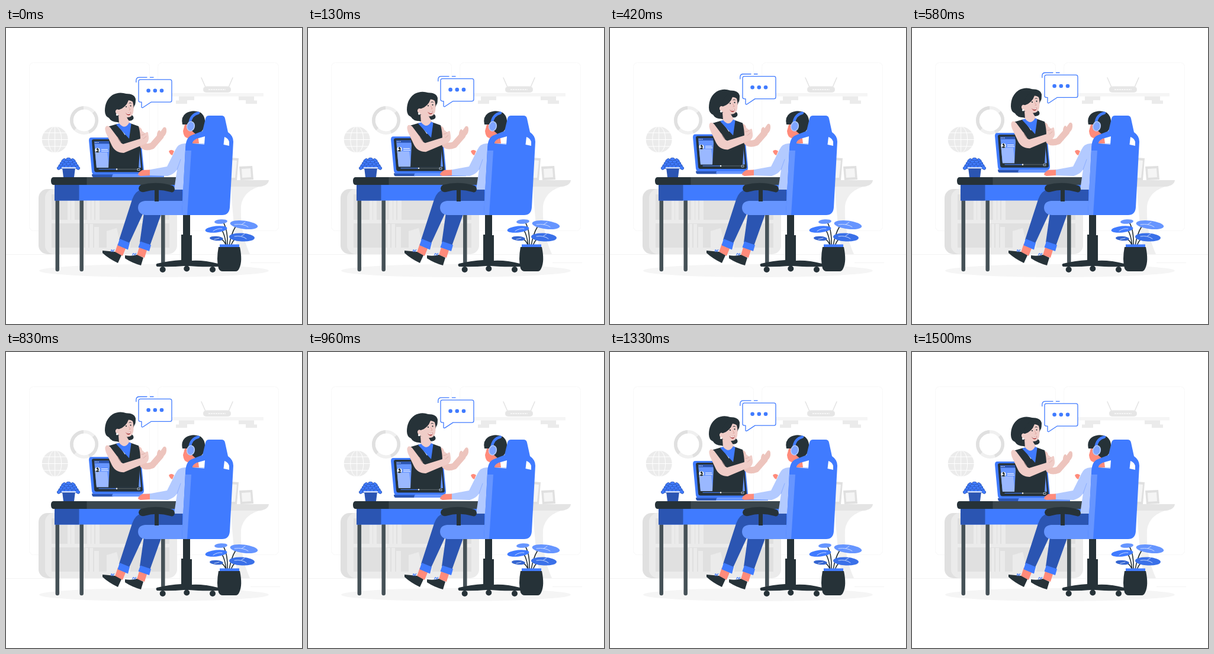
An HTML page that plays this animation: 500x500 px, repeating every 1540 ms.

```html
<!DOCTYPE html>
<html lang="en">
<head>
<meta charset="utf-8">
<title>Video call</title>
<style>
  html, body { margin: 0; height: 100%; overflow: hidden; background: #fff; }
  svg { display: block; width: 100vw; height: 100vh; }
  .blue { fill: #407bff; } .navy { fill: #2b55b2; } .sky { fill: #6695ff; } .pale { fill: #b3caff; }
  .dark { fill: #263238; } .slate { fill: #3b474d; } .coral { fill: #ff8b7b; } .skin { fill: #f0cdc8; }
  .g1 { fill: #f5f5f5; } .g2 { fill: #ebebeb; } .g3 { fill: #e0e0e0; } .white { fill: #fff; }
  .line { fill: none; stroke-linecap: round; stroke-linejoin: round; }
</style>
</head>
<body>
<svg viewBox="0 0 500 500">
  <!-- room -->
  <g fill="none" stroke="#f8f8f8">
    <rect x="39.5" y="58.5" width="203" height="284" rx="7"/>
    <rect x="256.5" y="58.5" width="204" height="284" rx="7"/>
    <path d="M0 382.5H500M413 396.5h50" stroke="#f3f3f3"/>
  </g>
  <ellipse class="g1" cx="250" cy="410" rx="194" ry="11"/>
  <circle class="g2" cx="82.700" cy="188.500" r="22"/>
  <g fill="none" stroke="#fff">
    <ellipse cx="82.700" cy="188.500" rx="11" ry="22"/>
    <path d="M82.700 166v45M60 188.500h45M64 177h38M64 200h38"/>
  </g>
  <g fill="none" stroke-width="5.500">
    <circle cx="132" cy="156" r="21.300" stroke="#f0f0f0"/>
    <path d="M117 171A21.300 21.300 0 0 1 131 134.700M148 142A21.300 21.300 0 0 1 140 175.700" stroke="#e0e0e0"/>
  </g>

  <!-- router shelf -->
  <path class="g1" d="M275 110H435V115.500H275Z"/>
  <path class="g2" d="M292 115.500H318V122H306V128H287V122.500H292ZM419 115.500H393V122H405V128H424V122.500H419Z"/>
  <path class="line" stroke="#e3e3e3" stroke-width="1.500" d="M337 100L330 84M376 100L383 84"/>
  <path fill="#e6e6e6" d="M339 98.500H374Q380 99 380 104T374 109H339Q333 109 333 104T339 98.500Z"/>
  <path stroke="#f5f5f5" stroke-width="2" stroke-dasharray="3 1" d="M342 104h29"/>

  <!-- bookcase -->
  <rect class="g3" x="55" y="272" width="60" height="110" rx="15"/>
  <rect class="g2" x="66" y="272" width="223" height="110" rx="15"/>
  <path class="g3" d="M77 281H276V324H77ZM77 330H276V371H77Z"/>
  <path class="g2" d="M104 290h5v34h-5zM110 290h6v34h-6zM137 290h6v34h-6zM144 290h5v34h-5zM151 290h7v34h-7zM134 331h5v40h-5zM141 331h6v40h-6zM149 336h8v35h-8zM170 343l17-5 8 33h-25zM200 342h10v29h-10z"/>

  <!-- side table -->
  <path fill="#efefef" d="M380 266H434Q401 274 397 300Q395 345 412 382H392Q383 330 380 266Z"/>
  <path fill="#e4e4e4" d="M375 257H444Q443 266 429 268H375Z"/>
  <path class="g3" d="M378 219L393 220L390 257H374Z"/>
  <path class="g1" d="M379 223L390 224L387 253H377Z"/>
  <path class="g3" d="M394 234L416 233L418 256L396 257Z"/>
  <path class="g1" d="M398 238L413 237L414 252L399 253Z"/>

  <!-- desk -->
  <path class="line" stroke="#455157" stroke-width="6.500" d="M86.800 290V408M127.700 290V408M265.300 312V395"/>
  <path class="blue" d="M82 264H299V291.500H82Z"/>
  <path class="navy" d="M82 264H123.500V291.500H82Z"/>
  <path class="slate" d="M130 252H297V265H130Z"/>
  <path class="dark" d="M80 252H136.500V265H80Q76 265 76 258.500T80 252Z"/>

  <!-- succulent -->
  <path class="navy" d="M95 236H117L115 252H97Z"/>
  <g class="blue" id="succulent" stroke="#2b55b2" stroke-width=".8"></g>
  <path stroke="#fff" stroke-width="1.800" d="M94 236.300H118"/>

  <!-- floating caller -->
  <g id="floating">
    <path class="navy" d="M145 247H181V252H148Q145 252 145 247Z"/>
    <path class="sky" d="M180 247.500H267V252H179Z"/>
    <path class="blue" d="M144 185H223Q227 185 228 188.500L233 241Q233 247 229 247.500H149Q146 247.500 145 243L140 190Q140 185 144 185Z"/>
    <path class="dark" d="M148 188H223Q226 188 226.500 190L231 240Q231 243.500 228 243.500H152.500Q149.500 243.500 149 240L145 191Q145 188 148 188Z"/>
    <path class="sky" d="M149 191.500H224L228 236H153Z"/>
    <path fill="#9ab8ff" d="M150.500 210H171L174 236H153Z"/>
    <path class="navy" d="M149 191.500H224L224.400 195.500H149.400Z"/>
    <path stroke="#fff" stroke-dasharray="1.500 1" d="M150 193.500h7"/>
    <circle class="white" cx="154.500" cy="206.500" r="4"/>
    <path class="dark" d="M151.500 209.500q3-4.500 6 0-3 2-6 0zM152.500 205q2-5 4 0t-4 0z"/>
    <path stroke="#fff" d="M161 205.300h11M161 208h12"/>
    <path class="line" stroke="#5c666b" d="M157 238.500h66"/>
    <path class="line" stroke="#407bff" d="M157 238.500h30"/>
    <circle class="white" cx="187" cy="238.500" r="1.200"/>
    <path stroke="#d9e5ff" d="M222 237.500h4v3h-4z" fill="none" stroke-width=".7"/>

    <!-- far arm, hair, face -->
    <path class="line" stroke="#edc4bd" stroke-width="11" d="M224 173Q228 187 229 195Q234 204 247 199L261 183"/>
    <path fill="#edc4bd" d="M255 187Q254 176 258 173Q260 172 261 175L266 168Q270 166 271 171Q272 179 266 184L260 190Z"/>
    <path class="dark" d="M167 140Q167 122 180 113Q191 107 203 111Q217 111 219 120Q219 127 217 131L211 146Q217 149 215 154Q211 159 202 155Q197 162 188 159Q178 159 174 152Q167 149 167 140Z"/>
    <path class="skin" d="M190 148L191 162L200 174L210 161L204 151Z"/>
    <path class="skin" d="M190 138Q199 132 202 121Q207 123 213 121Q216 130 215.500 138Q215 148 209 150.500Q198 153 191 148Q184 145 185 140Q187 136 190 138Z"/>
    <path class="dark" d="M188 137Q190 126 199 117L214 118Q220 121 218 131Q216 123 207 122Q203 134 191 138Z"/>
    <circle class="white" cx="187.700" cy="146.500" r="1.800"/>
    <circle class="dark" cx="203" cy="133" r="1.100"/>
    <circle class="dark" cx="210.500" cy="131.500" r="1.100"/>
    <path class="line" stroke="#263238" d="M199 129.500q2-2.500 4-2M208 127q2-1.500 3.500 0"/>
    <path class="line" stroke="#d99a94" stroke-width=".8" d="M207.500 134l2.500 4-2 .5"/>
    <path fill="#b34b4b" d="M202 143.500Q207 145 211 142Q210 148 206.500 147.500Q204 147 202 143.500Z"/>
    <path class="white" d="M203 143.800Q207 145 210.500 142.500L210 144.500Q207 146 204 145Z"/>

    <!-- vest and near arm -->
    <path class="dark" d="M171 167L188 162L201 181L210 161L224 166Q227 177 227 190L224 236.500H173L175 200Z"/>
    <path class="blue" d="M186 163L191 161Q201 173 208 160L211.500 162L208 187Z"/>
    <path class="skin" d="M169 166Q165 170 171 182L179 199Q185 211 199 211L237 195Q242 191 241 184L240 177Q239 174 235 178L229 173Q226 173 228 180L227 187L198 196Q193 195 188 184L176 168Q172 164 169 166Z"/>
    <path class="line" stroke="#d9a9a3" stroke-width=".8" d="M229 181q4 0 6-3M232 187l5-4M188 184l6 9"/>

    <!-- speech bubble -->
    <g stroke="#407bff" stroke-width="1.300" stroke-linejoin="round" fill="#fff">
      <path d="M227 87.200H277Q280 87.200 280 90.500V122Q280 125.200 277 125.200H245L231 134.500Q228.500 135 229 132V125.200H227Q224 125.200 224 122V90.500Q224 87.200 227 87.200Z"/>
      <path fill="none" d="M219.800 92V88.500Q220 83.300 225 83.300H238.500M243 83.300H249.500"/>
    </g>
    <g class="blue"><circle cx="240.600" cy="105.800" r="3.300"/><circle cx="251.800" cy="105.800" r="3.300"/><circle cx="263" cy="105.800" r="3.300"/></g>
  </g>

  <!-- legs -->
  <path class="coral" d="M189 364L203 370L197 385L184 379ZM226 367L239 372L234 388L221 384Z"/>
  <path class="dark" d="M163 376Q174 377 184 378L195 384L189 397Q174 390 163 380ZM201 384Q212 386 221 383L232 388L228 401Q213 397 201 389Z"/>
  <path class="line" stroke="#407bff" stroke-width="1.200" d="M178 378q-1-4 1-3l2 3q0-4 2-3M214 384q0-4 2-3l2 3q0-4 2-3"/>
  <path class="navy" d="M298 272H230Q218 275 213 290L191 358L208 364L232 312H298Z"/>
  <path class="navy" d="M233 312L226 362L243 368L263 312Z"/>
  <path class="blue" d="M192 356L209 363L206 374.500L188.500 367ZM227 360.500L245 366.500L242 377L223.500 370.500Z"/>

  <!-- listener -->
  <path class="coral" d="M275 208Q279 204 284 208L281 215Q277 214 275 208Z"/>
  <path class="coral" d="M302 163L299 174Q300 185 307 186L305 197L326 195L322 164Z"/>
  <path class="pale" d="M304 195Q291 194 286 206L272 234L242 239.500V249L273 250Q284 247 289 239L284 273H303L337 199V195H325Z"/>
  <path class="line" stroke="#8caeff" d="M289 239L295 222"/>
  <path class="coral" d="M243 239.500L230 240Q223 244 223 248L227 250L243 249Z"/>
  <path class="dark" d="M298 163Q295 150 304 144Q316 137 329 143Q339 151 335 167Q330 180 320 179L312 172L306 163Z"/>
  <path class="line" stroke="#407bff" stroke-width="4.500" d="M310.500 160Q313 146 325 143.500"/>
  <ellipse cx="312" cy="166" rx="6.200" ry="8" fill="#7ea4ff" stroke="#b3caff" stroke-width="1.600" transform="rotate(12 312 166)"/>

  <!-- chair -->
  <path class="dark" d="M299 315H311V350H314V393Q335 392 358 398Q362 400 360 403Q330 404 310 402H300Q280 404 255 403Q252 400 255 398Q276 393 296 392V349H299Z"/>
  <g class="dark"><circle cx="264.700" cy="408" r="5"/><circle cx="305.300" cy="406.500" r="5"/><circle cx="349" cy="408" r="5"/></g>
  <path class="sky" d="M300 292H235Q223 293 223 304Q224 315 236 316H305V206L303 206Z"/>
  <path class="blue" fill-rule="evenodd" d="M343 148H364Q369 148 370 153L375 176Q384 182 384 192L378 303Q377 316 365 316H297L303 205Q303 185 314 181L332 174L337 153Q338 148 343 148ZM336 183L335 197L315 195Q315 190 322 187ZM369 184L367.500 197L377 199V192Q375 186 369 184Z"/>
  <path class="sky" d="M303 207H313L306 316H297Z"/>
  <path class="dark" d="M251 272H258V293H251ZM228 265Q254 258 281 266Q285 268 285 273Q283 279 278 277Q255 270 233 277Q226 278 224 272Q224 267 228 265Z"/>

  <!-- plant -->
  <path class="line" stroke="#263238" stroke-width="1.600" d="M374 368Q375 342 367 328M377 368Q380 348 388 335M372 368Q370 350 365 342M380 368Q383 358 390 354M371 366Q369 360 364 357"/>
  <g class="blue">
    <ellipse class="sky" cx="402" cy="332.500" rx="23.500" ry="7" transform="rotate(7 402 332)"/>
    <ellipse cx="355" cy="340" rx="18.500" ry="5.500" transform="rotate(-6 355 340)"/>
    <ellipse class="sky" cx="363" cy="327" rx="11" ry="3.800" transform="rotate(-4 363 327)"/>
    <ellipse fill="#3a70e8" cx="398.500" cy="353.500" rx="21.500" ry="7" transform="rotate(3 398 353)"/>
    <ellipse fill="#3465d1" cx="355.500" cy="355.500" rx="11.500" ry="3.700" transform="rotate(4 355 355)"/>
    <path d="M361 365.500H394V371H361Z"/>
  </g>
  <path class="line" stroke="#d9e5ff" stroke-width=".9" d="M386 332Q400 330 409 336M398 332l6-4M365 339Q357 338 350 343M386 352Q398 350 406 356M398 351l5-3M360 355l-8 2"/>
  <path class="dark" d="M359 370H395Q400 394 394 406Q392 411 388 411H366Q361 411 359 406Q355 391 359 370Z"/>
</svg>
<script>
  const floating = document.getElementById("floating");
  const succulent = document.getElementById("succulent");
  const FPS = 24, LOOP = 1540, CYCLE = 36, RISE = 10;

  // Overlapping leaves in rows, widest at the bottom.
  let leaves = "";
  for (let row = 0; row < 4; row++) {
    const count = 3 + row, spread = 8 + row * 2.5;
    for (let i = 0; i < count; i++) {
      const side = 2 * i / (count - 1) - 1;
      const x = 105.500 + side * spread, y = 222 + row * 4 + side * side * 2;
      leaves += `<ellipse cx="${x}" cy="${y}" rx="4" ry="2.800" transform="rotate(${side * 35} ${x} ${y})"/>`;
    }
  }
  succulent.innerHTML = leaves;

  // Linear rise and fall, one step past the lowest point at the loop start.
  const lift = step => RISE * (1 - Math.abs(1 - 2 * (step % CYCLE) / CYCLE));

  function draw(now) {
    const step = Math.floor((now % LOOP + 5) * FPS / 1000);
    floating.setAttribute("transform", `translate(0 ${lift(1) - lift(step + 1)})`);
    requestAnimationFrame(draw);
  }
  draw(performance.now());
</script>
</body>
</html>
```
